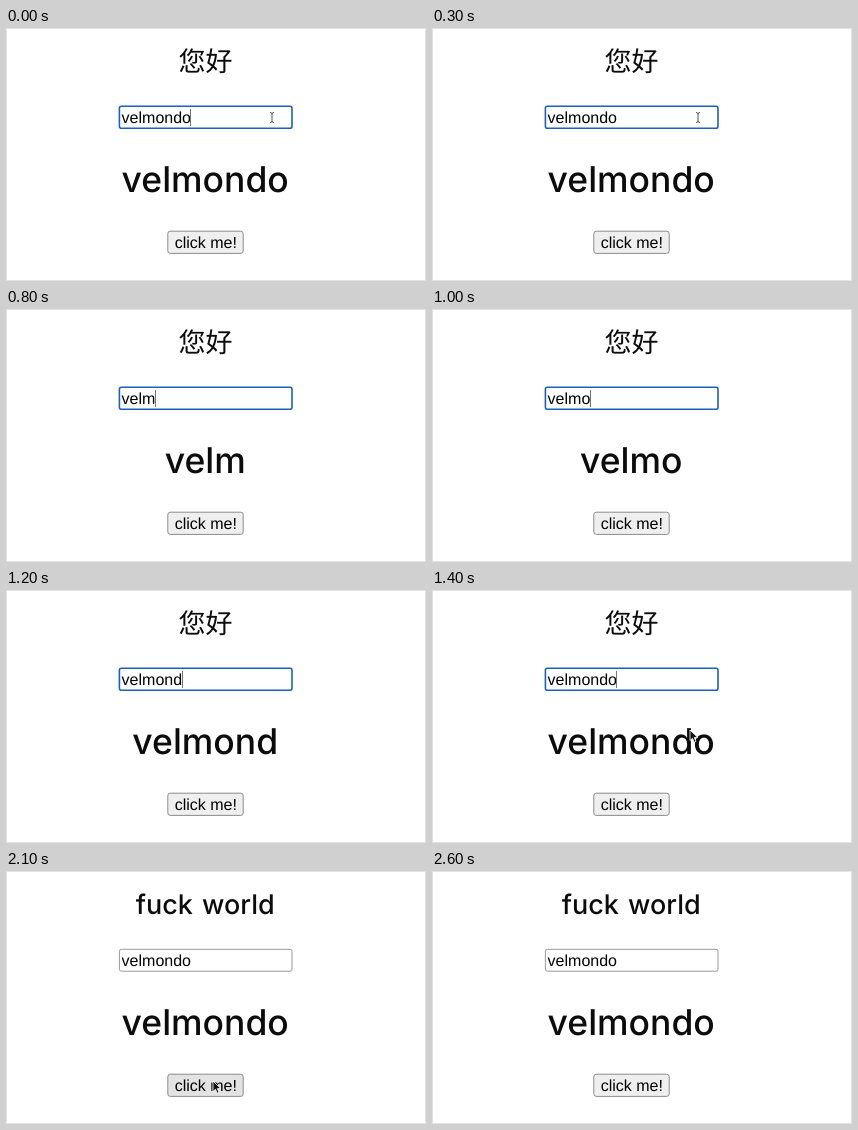
An HTML page for the animation above (2.8 s loop, 420 px wide and 253 px high).

```html
<!DOCTYPE html>
<html lang="en">
<head>
<meta charset="utf-8">
<title>Input and button</title>
<style>
  html, body { margin: 0; width: 100%; height: 100%; overflow: hidden; background: #fff; }
  svg { display: block; width: 420px; height: 253px; }
  text { fill: #0c0c0c; text-rendering: geometricPrecision; }
  .head { font-family: Inter, sans-serif; font-weight: 500; text-anchor: middle; }
  .zh { font-family: "Noto Sans CJK SC", "Noto Sans CJK", sans-serif; font-weight: 500; }
  .ui { font: 16px "Liberation Sans", Arial, sans-serif; fill: #000; }
  #reply { word-spacing: 2px; }
  #field { fill: #fff; stroke: #1a61bd; stroke-width: 1.6; }
  #field.blurred { stroke: #999; stroke-width: 1; }
  #button { fill: #efefef; stroke: #8c8c8c; }
  #button.hover { fill: #e3e3e3; }
</style>
</head>
<body>
<svg viewBox="0 0 420 253">
  <rect x=".5" y=".5" width="419" height="252" fill="#fff" stroke="#e2e2e2"/>
  <text id="hello" class="head zh" x="199.5" y="43.3" font-size="27">您好</text>
  <text id="reply" class="head" x="199.2" y="43" font-size="27">fuck world</text>

  <rect id="field" x="113.4" y="78.3" width="172.6" height="21.9" rx="2"/>
  <text id="value" class="ui" x="115.6" y="95"></text>
  <rect id="caret" y="81" width="1" height="17" fill="#777"/>
  <path id="beam" d="M264 84.5q2 0 2 1.5v7q0 1.5-2 1.5M268 84.5q-2 0-2 1.5M266 93q0 1.5 2 1.5" fill="none" stroke="#555"/>

  <text id="title" class="head" x="199.2" y="164" font-size="35.5"></text>

  <rect id="button" x="161.8" y="203.2" width="75.4" height="22.2" rx="2.5"/>
  <text class="ui" x="199.8" y="219.7" text-anchor="middle">click me!</text>
  <path id="pointer" d="M0 0v10.5l2.5-2.2 1.7 3.9 1.8-.8-1.7-3.8h3.5z" fill="#111" stroke="#fff" stroke-width=".8"/>
</svg>
<script>
const LOOP = 2800;
const STEP = 100;
const WORD = "velmondo";
const START = [258, 140], REST = [207, 210], EXIT = [305, 218];
const $ = id => document.getElementById(id);

const clamp = (v, lo, hi) => Math.min(hi, Math.max(lo, v));
const progress = (t, from, to) => clamp((t - from) / (to - from), 0, 1);
const mix = (a, b, u) => a.map((v, i) => v + (b[i] - v) * u);
const show = (id, on) => $(id).setAttribute("visibility", on ? "visible" : "hidden");

// Four letters go, then come back, one per step.
function letterCount(t) {
  const erased = clamp(t / STEP - 4, 0, 4);
  const typed = clamp(t / STEP - 9, 0, 4);
  return WORD.length - erased + typed;
}

// Slow down towards the button, wait, then speed away.
function pointerAt(t) {
  const come = progress(t, 1400, 1800);
  const leave = progress(t, 2200, 2400);
  return leave ? mix(REST, EXIT, leave ** 2) : mix(START, REST, 1 - (1 - come) ** 2);
}

function draw(time) {
  const t = Math.floor(time / STEP) * STEP;
  const clicked = t >= 2000;

  show("hello", !clicked);
  show("reply", clicked);
  $("field").classList.toggle("blurred", clicked);
  $("value").textContent = $("title").textContent = WORD.slice(0, letterCount(t));

  show("caret", t < 100 || t >= 800 && t < 1500);
  $("caret").setAttribute("x", Math.floor(115.6 + $("value").getComputedTextLength()));
  show("beam", t < 500);

  $("button").classList.toggle("hover", t >= 1600 && t < 2400);
  show("pointer", t >= 1400 && t < 2500);
  $("pointer").setAttribute("transform", `translate(${pointerAt(t)})`);
}

const begin = performance.now();
function tick() {
  draw((performance.now() - begin) % LOOP);
  requestAnimationFrame(tick);
}
tick();
</script>
</body>
</html>
```
